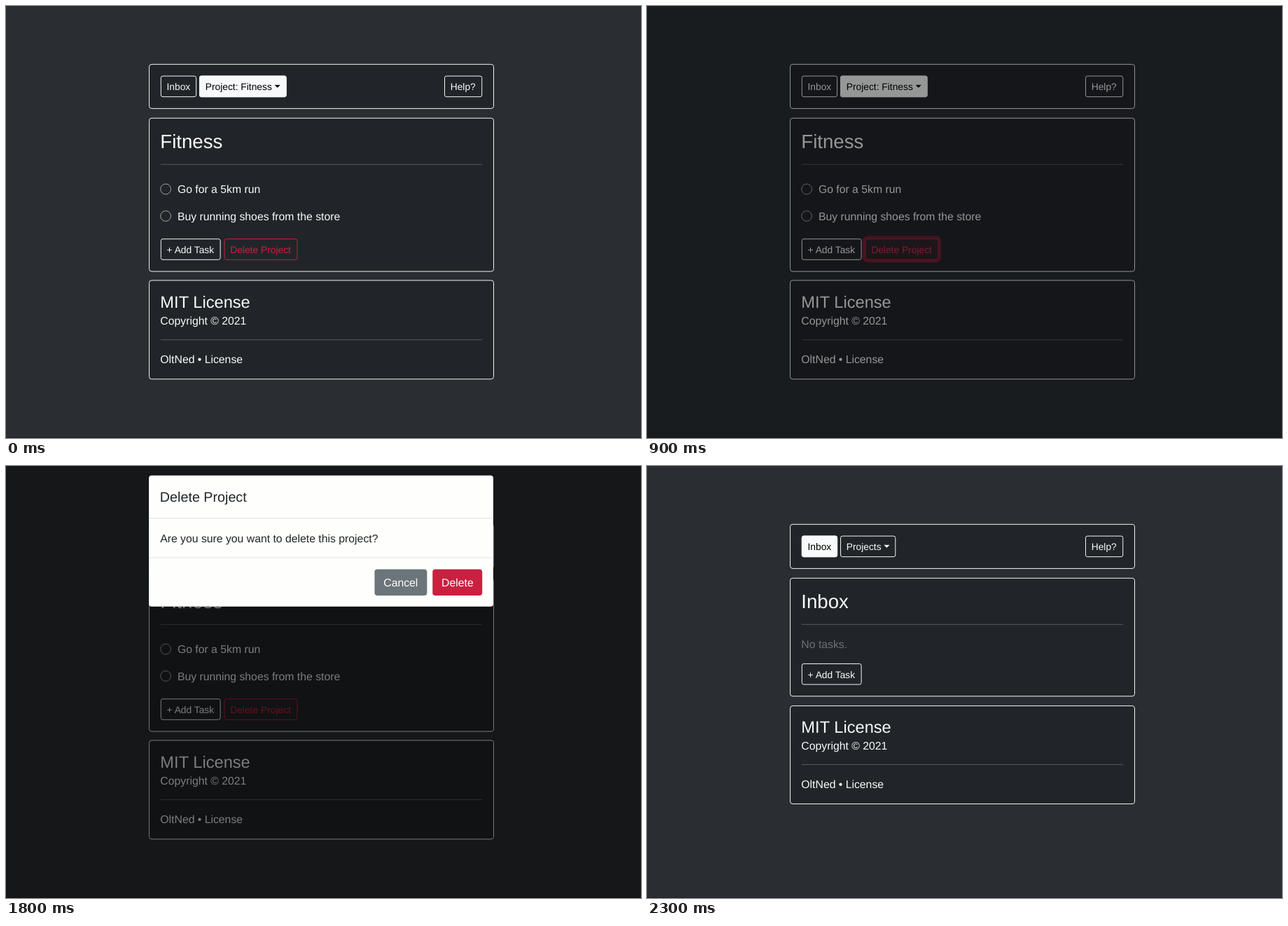
Write an HTML page with a canvas that moves like this. It is 907 px wide and 617 px high and loops after 3.8 s.

```html
<!DOCTYPE html>
<html lang="en">
<head>
<meta charset="utf-8">
<title>Task list</title>
<style>
  html, body { margin: 0; width: 100%; height: 100%; overflow: hidden; background: #2a2e32; }
  canvas { display: block; }
</style>
</head>
<body>
<canvas id="stage" width="907" height="617"></canvas>
<script>
const W = 907, H = 617, SCALE = 907 / 920;
const LOOP = 3800, STEP = 100, FADE = 150, SLIDE = 300;
const FONT = '"Liberation Sans", Arial, sans-serif';

const LIGHT = [248, 249, 250], BLACK = [0, 0, 0];
const RED = [204, 32, 64], DARK_RED = [176, 28, 56];
const BODY = '#2a2e32', CARD = '#212529', MUTED = '#6a7076';
const INK = '#212529', RULE = '#dee2e6', GREY = '#6c7579', PAPER = '#fefffc';

// Moments of the interaction, in ms
const HOVER = 575, CLICK = 780, SHOW = 978, SHOWN = 1250;
const HOVER_OK = 1775, FOCUS_OK = 1915, HIDE = 1978, HIDDEN = 2130;

const stage = document.getElementById('stage').getContext('2d');
const layer = document.createElement('canvas');
layer.width = W;
layer.height = H;
const sheet = layer.getContext('2d');
let g = stage;

const ramp = (t, start, length = FADE) => Math.min(1, Math.max(0, (t - start) / length));
const rgba = (c, a = 1) => `rgba(${c.map(Math.round)},${a})`;
const mix = (a, b, k) => a.map((v, i) => v + (b[i] - v) * k);

// Cubic Bezier easing through (x1,0) and (x2,1)
function bezier(x1, x2, x) {
  let lo = 0, hi = 1, u = x;
  for (let i = 0; i < 24; i++) {
    u = (lo + hi) / 2;
    const v = 3 * u * (1 - u) ** 2 * x1 + 3 * u * u * (1 - u) * x2 + u ** 3;
    if (v < x) lo = u; else hi = u;
  }
  return 3 * u * u * (1 - u) + u ** 3;
}
const easeOut = x => bezier(0, 0.58, x);
const easeInOut = (t, start) => bezier(0.42, 0.58, ramp(t, start));

function text(str, x, y, size, color) {
  g.font = `${size}px ${FONT}`;
  g.textRendering = 'geometricPrecision';
  g.fillStyle = color;
  g.fillText(str, x, y);
}

function rect(x, y, w, h, color) {
  g.fillStyle = color;
  g.fillRect(x, y, w, h);
}

// Filled box with a 1px border inside its edge
function box(x, y, w, h, r, fill, border) {
  g.beginPath();
  g.roundRect(x, y, w, h, r);
  g.fillStyle = fill;
  g.fill();
  if (!border) return;
  g.beginPath();
  g.roundRect(x + 0.5, y + 0.5, w - 1, h - 1, r - 0.5);
  g.lineWidth = 1;
  g.strokeStyle = border;
  g.stroke();
}

function ring(x, y, w, h, r, k, color) {
  if (k <= 0) return;
  const d = 4 * k;
  g.beginPath();
  g.roundRect(x - d, y - d, w + 2 * d, h + 2 * d, r + d);
  g.roundRect(x, y, w, h, r);
  g.fillStyle = rgba(color, 0.5 * k);
  g.fill('evenodd');
}

// Small outline button; k is how far it is filled
function button(label, x, y, w, k = 0, color = LIGHT, over = BLACK) {
  box(x, y, w, 31, 3.2, rgba(color, k), rgba(color));
  const ink = rgba(mix(color, over, k));
  text(label, x + 8.8, y + 21, 14, ink);
  return ink;
}

function dropdown(label, w, k) {
  g.fillStyle = button(label, 280, 101, w, k);
  const x = 280 + w - 17.3;
  g.beginPath();
  g.moveTo(x, 114.3);
  g.lineTo(x + 8.4, 114.3);
  g.lineTo(x + 4.2, 118.5);
  g.fill();
}

const card = (y, bottom) => box(207, y, 500, bottom - y, 4, CARD, rgba(LIGHT));
const divider = y => rect(224, y, 466, 1, rgba(LIGHT, 0.25));

function task(label, y) {
  g.beginPath();
  g.arc(231.4, y - 5.7, 7.5, 0, Math.PI * 2);
  g.lineWidth = 1;
  g.strokeStyle = '#a3a6a8';
  g.stroke();
  text(label, 248.4, y, 16, rgba(LIGHT));
}

function footer(y, bottom, top) {
  const ink = rgba(LIGHT);
  card(y, bottom);
  text('MIT License', 223.5, top + 39.9, 24, ink);
  text('Copyright © 2021', 223.5, top + 64.6, 16, ink);
  divider(Math.round(top + 85.8));
  text('OltNed', 223.5, top + 120, 16, ink);
  text('• License', 277.7, top + 120, 16, ink);
}

function page(t) {
  const done = t >= HIDE;
  const swap = easeInOut(t, HIDE);
  rect(0, 0, 920, 627, BODY);

  card(84, 149);
  button('Inbox', 224, 101, 52, swap);
  if (done) dropdown('Projects', 80.4, 1 - swap);
  else dropdown('Project: Fitness', 126.4, 1);
  button('Help?', 635, 101, 55);

  card(162, done ? 334 : 385);
  text(done ? 'Inbox' : 'Fitness', 223.5, 206, 28, rgba(LIGHT));
  divider(229);
  if (done) {
    text('No tasks.', 223.5, 263.5, 16, MUTED);
    button('+ Add Task', 224, 286, 87);
    footer(347, 490, 346.6);
  } else {
    task('Go for a 5km run', 271);
    task('Buy running shoes from the store', 310);
    button('+ Add Task', 224, 337, 87);
    const hover = easeInOut(t, HOVER) - easeInOut(t, CLICK);
    const focus = easeInOut(t, CLICK) - easeInOut(t, SHOWN);
    ring(316, 337, 106.5, 31, 3.2, focus, RED);
    button('Delete Project', 316, 337, 106.5, hover, RED, [255, 255, 255]);
    footer(397, 541, 397.4);
  }
  rect(0, 616 / SCALE, 920, 2, '#1b1e21');
}

function action(label, x, w, color) {
  box(x, 149.6, w, 38, 4, color);
  text(label, x + 13, 174.3, 16, '#fff');
}

function dialog(t, lift) {
  g.save();
  g.translate(0, -lift);
  box(206, 12.6, 501, 192.2, 5, 'rgba(0,0,0,0)', 'rgba(0,0,0,.2)');
  box(207, 13.6, 499, 190, 4, PAPER);
  text('Delete Project', 223, 51.6, 20, INK);
  rect(207, 75.2, 499, 1, RULE);
  text('Are you sure you want to delete this project?', 223.3, 110.3, 16, INK);
  rect(207, 132.4, 499, 1, RULE);
  action('Cancel', 534, 76, GREY);
  ring(618, 149.6, 72, 38, 4, easeInOut(t, FOCUS_OK), RED);
  action('Delete', 618, 72, rgba(mix(RED, DARK_RED, easeInOut(t, HOVER_OK))));
  g.restore();
}

function begin(ctx) {
  g = ctx;
  g.setTransform(1, 0, 0, 1, 0, 0);
  g.clearRect(0, 0, W, H);
  g.scale(SCALE, SCALE);
}

function draw(t) {
  begin(stage);
  page(t);
  const shade = 0.5 * (ramp(t, CLICK) - ramp(t, HIDDEN));
  rect(0, 0, 921, 628, `rgba(0,0,0,${shade})`);

  const alpha = ramp(t, SHOW) - ramp(t, HIDE);
  if (alpha <= 0) return;
  const drop = easeOut(ramp(t, SHOW, SLIDE)) - easeOut(ramp(t, HIDE, SLIDE));
  begin(sheet);
  dialog(t, 50 * (1 - drop));
  stage.setTransform(1, 0, 0, 1, 0, 0);
  stage.globalAlpha = alpha;
  stage.drawImage(layer, 0, 0);
  stage.globalAlpha = 1;
}

// The picture advances ten times a second
const start = performance.now();
function tick() {
  const t = (performance.now() - start) % LOOP;
  draw(Math.floor(t / STEP) * STEP);
  requestAnimationFrame(tick);
}
tick();
</script>
</body>
</html>
```
